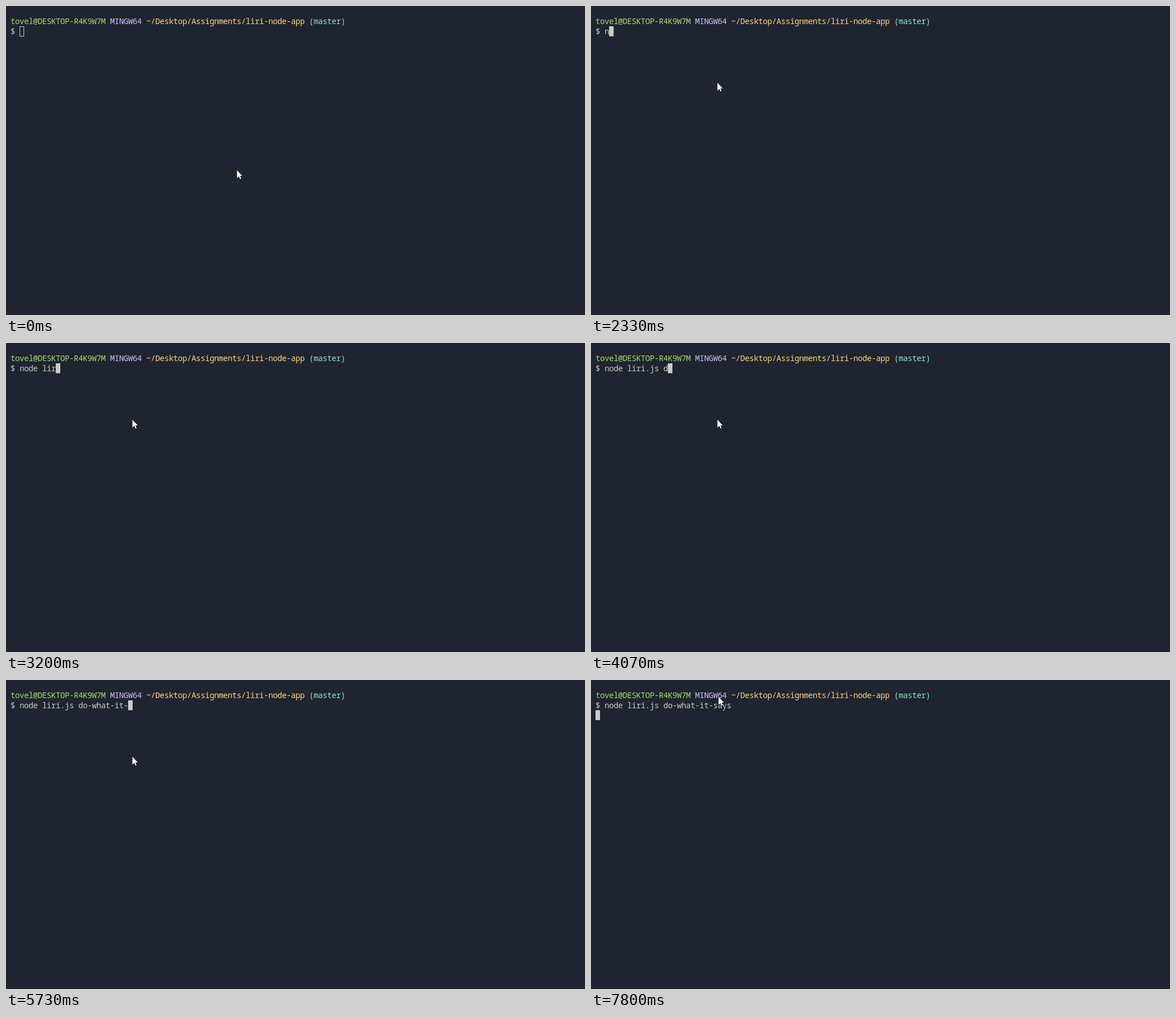
These frames come from a looping animation (1024 by 547 pixels, 8000 ms). An HTML page with a canvas:

```html
<!DOCTYPE html>
<html lang="en">
<head>
<meta charset="utf-8">
<title>Terminal</title>
<style>
  html, body { margin: 0; width: 100%; height: 100%; overflow: hidden; background: #1f2430; }
  canvas { display: block; }
</style>
</head>
<body>
<canvas width="1024" height="547"></canvas>
<script>
const ctx = document.querySelector('canvas').getContext('2d');
const LOOP = 8000, FOCUS = 600, ENTER = 7130;
const CELL = 8, LEFT = 8, ROW_TOP = 36, ROW_HEIGHT = 17.5;
const TEXT = '#cbccc6';

const prompt = [
  ['tovel@DESKTOP-R4K9W7M', '#a8dd6c'],
  ['MINGW64', '#d4bfff'],
  ['~/Desktop/Assignments/liri-node-app', '#ffd580'],
  ['(master)', '#95e6cb'],
];

// Bursts of even typing: text, time of first and last character
const bursts = [
  ['node ', 2330, 2800],
  ['lir', 3000, 3200],
  ['i.js ', 3470, 3470],
  ['do', 4070, 4200],
  ['-w', 4400, 4530],
  ['hat-', 4730, 5000],
  ['it', 5400, 5470],
  ['-says', 5730, 6470],
];

// Eased pointer moves in screen updates: first, last, target
const UPDATES_PER_MS = 0.015;
const moves = [
  { from: 0, to: 4, x: 221, y: 137 },
  { from: 11, to: 14, x: 223, y: 135 },
  { from: 114, to: 117, x: 225, y: 29 },
];
const arrow = new Path2D('M.5 .5V15L4 11.7L6 16.6L8 15.8L6 11H10Z');

function typedText(t) {
  return bursts.map(([text, first, last]) => {
    const gap = (last - first) / (text.length - 1);
    return [...text].filter((_, i) => first + i * gap <= t).join('');
  }).join('');
}

function pointerAt(t) {
  const update = Math.floor((t + 4) * UPDATES_PER_MS);
  let x = 408, y = 290;
  for (const move of moves) {
    const p = Math.min(1, Math.max(0, (update - move.from) / (move.to - move.from)));
    const eased = p * p * (3 - 2 * p);
    x += (move.x - x) * eased;
    y += (move.y - y) * eased;
  }
  return [Math.round(x), Math.round(y)];
}

function write(text, column, baseline, color) {
  ctx.fillStyle = color;
  ctx.fillText(text, LEFT + column * CELL, baseline);
}

function drawPrompt() {
  let column = 0;
  for (const [text, color] of prompt) {
    write(text, column, 32, color);
    column += text.length + 1;
  }
}

function drawCaret(t, typed) {
  const entered = t >= ENTER;
  const x = LEFT + (entered ? 0 : 2 + typed) * CELL;
  const y = ROW_TOP + (entered ? ROW_HEIGHT : 0);
  ctx.fillStyle = ctx.strokeStyle = TEXT;
  if (t < FOCUS) ctx.strokeRect(x + 0.5, y + 0.5, CELL - 1, 17);
  else ctx.fillRect(x, y, CELL, ROW_HEIGHT);
}

function drawPointer(t) {
  ctx.save();
  ctx.translate(...pointerAt(t));
  ctx.strokeStyle = '#000';
  ctx.stroke(arrow);
  ctx.fillStyle = '#fff';
  ctx.fill(arrow);
  ctx.restore();
}

function draw(now) {
  const t = now % LOOP;
  const typed = typedText(t);
  ctx.fillStyle = '#1f2430';
  ctx.fillRect(0, 0, 1024, 547);
  drawPrompt();
  write('$ ' + typed, 0, 50, TEXT);
  drawCaret(t, typed.length);
  drawPointer(t);
}

// Terminal cells are slightly narrower than the font's own advance.
ctx.font = '500 14px "Noto Sans Mono", monospace';
ctx.letterSpacing = `${CELL - ctx.measureText('0').width}px`;

const start = performance.now();
function tick() {
  draw(performance.now() - start);
  requestAnimationFrame(tick);
}
tick();
</script>
</body>
</html>
```
